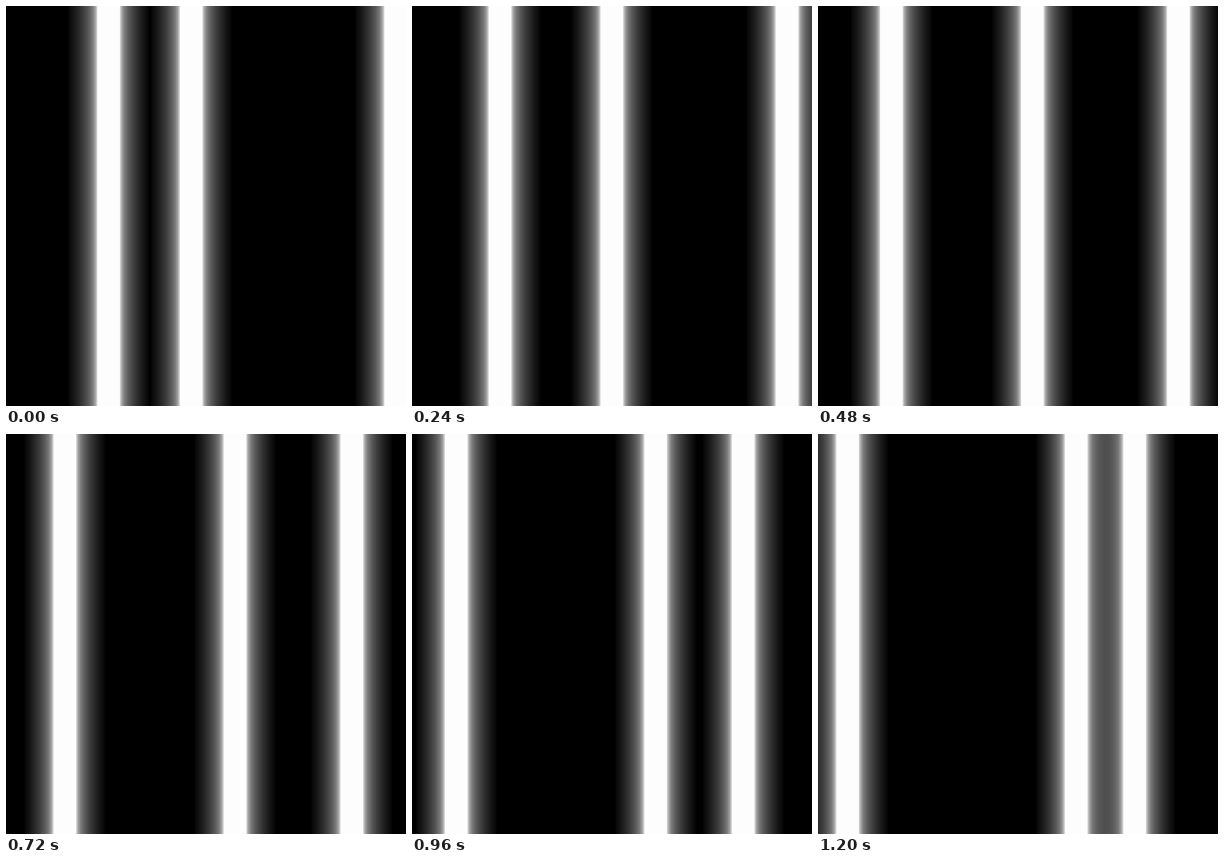
An HTML page with a canvas for the animation above (1320 ms loop, 400 by 400 pixels).

```html
<!DOCTYPE html>
<html lang="en">
<head>
<meta charset="utf-8">
<title>Gliding light bars</title>
<style>
  html, body { margin: 0; width: 100%; height: 100%; overflow: hidden; background: #000; }
  canvas { display: block; width: 100vw; height: 100vh; }
</style>
</head>
<body>
<canvas width="400" height="400"></canvas>
<script>
const ctx = document.querySelector('canvas').getContext('2d');
const LOOP = 1320, HOLD = 240, STEP = 14.6, REACH = 41;

// start centre and direction of each bar
const bars = [[102.6, -1], [185.2, 1], [389.6, -1]];

// distance from the bar's centre, grey level
const profile = [
  [0, 253], [10.8, 253], [12, 200], [13.5, 160], [16, 122], [20, 90],
  [25, 62], [30, 40], [35, 21], [39, 9], [REACH, 0]
];

function drawBar(x) {
  const glow = ctx.createLinearGradient(x - REACH, 0, x + REACH, 0);
  for (const [d, v] of profile) {
    for (const side of [-1, 1]) {
      glow.addColorStop((1 + side * d / REACH) / 2, `rgb(${v},${v},${v})`);
    }
  }
  ctx.fillStyle = glow;
  ctx.fillRect(x - REACH, 0, 2 * REACH, 400);
}

function draw(now) {
  const step = Math.floor(now % LOOP / HOLD);
  ctx.globalCompositeOperation = 'source-over';
  ctx.fillStyle = '#000';
  ctx.fillRect(0, 0, 400, 400);
  ctx.globalCompositeOperation = 'screen';
  for (const [start, dir] of bars) drawBar(start + dir * STEP * step);
}

const origin = performance.now();
function tick() {
  draw(performance.now() - origin);
  requestAnimationFrame(tick);
}
tick();
</script>
</body>
</html>
```
